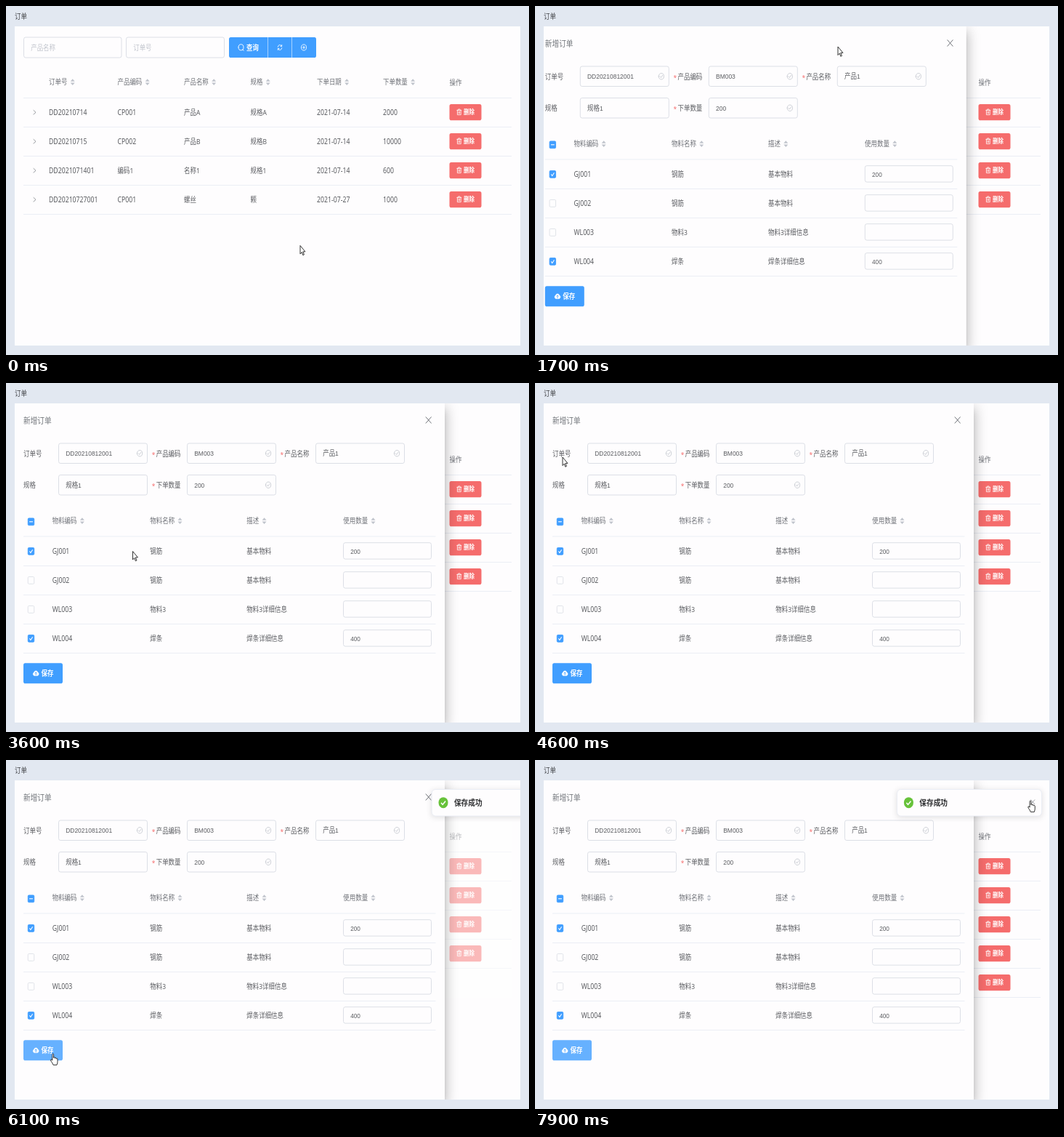
Write an HTML page that moves like this. It is 720 px wide and 480 px high and loops after 8000 ms.

```html
<!DOCTYPE html>
<html lang="zh-CN">
<head>
<meta charset="utf-8">
<title>订单</title>
<style>
  html, body { margin: 0; width: 100%; height: 100%; overflow: hidden; background: #e2e8f1; }
  svg { display: block; width: 720px; height: 480px; }
  text { font-family: "Noto Sans", "Noto Sans CJK SC", "Noto Sans CJK JP", sans-serif; white-space: pre; }
  .field { font-family: "Liberation Sans", "Noto Sans CJK SC", "Noto Sans CJK JP", sans-serif; }
</style>
</head>
<body>
<svg id="stage" viewBox="0 0 720 480" xmlns="http://www.w3.org/2000/svg"></svg>
<script>
// The page is shown at a reduced, slightly narrowed scale.
const SX = 0.605, SY = 0.7;
const BLUE = '#409eff', BLUE_HOVER = '#66b1ff', RED = '#f56c6c', GREEN = '#67c23a';
const PAPER = '#fefdfe', INK = '#5a5c60', HEAD = '#6e7177', PALE = '#c0c4cc', EDGE = '#dcdfe6', RULE = '#ebeef5';
const LOOP = 8000;

const at = (x, y, inner, attrs = '') =>
  `<g transform="translate(${x} ${y}) scale(${SX} ${SY})" ${attrs}>${inner}</g>`;
const text = (x, y, str, { size = 14, fill = INK, weight = 400, cls = '' } = {}) =>
  at(x, y, `<text class="${cls}" font-size="${size}" fill="${fill}" font-weight="${weight}">${str}</text>`);
const box = (x, y, w, h, fill, attrs = '') =>
  `<rect x="${x}" y="${y}" width="${w}" height="${h}" rx="2.4" ry="2.8" fill="${fill}" ${attrs}/>`;
const rule = (x1, x2, y) => `<path d="M${x1} ${y}H${x2}" stroke="${RULE}"/>`;
const icon = (x, y, d, color, width = 1.3, fill = 'none') =>
  at(x, y, `<path d="${d}" fill="${fill}" stroke="${color}" stroke-width="${width}" stroke-linecap="round" stroke-linejoin="round"/>`);
const ring = r => `M${-r} 0a${r} ${r} 0 1 0 ${2 * r} 0a${r} ${r} 0 1 0 ${-2 * r} 0`;
const cross = r => `M${-r} ${-r}L${r} ${r}M${r} ${-r}L${-r} ${r}`;
const cell = (x, cy, str) => /^[\x00-\x7f]+$/.test(str)
  ? text(x, cy + 4, str, { size: 14.4 })
  : text(x, cy + 4, str);

const carets = (x, y) => at(x, y,
  `<path d="M-5 -1.2L0 -6.2L5 -1.2ZM-5 1.4L0 6.4L5 1.4Z" fill="${PALE}"/>`);
const header = (x, cy, str) =>
  text(x, cy + 3.7, str, { fill: HEAD, weight: 500 }) + carets(x + str.length * 14 * SX + 7.3, cy);

function input(x, y, w, h, value, { size = 14, fill = INK, valid = false } = {}) {
  return box(x, y, w, h, PAPER, `stroke="${EDGE}"`) +
    text(x + 9.7, y + h / 2 + 3.6, value, { size, fill, cls: 'field' }) +
    (valid ? icon(x + w - 10.5, y + h / 2, ring(6) + 'M-3 0L-.5 2.5L3 -2', PALE, 1.2) : '');
}

const TRASH = 'M-5 -3.5H5M-2 -3.5V-5.5H2V-3.5M-4 -3.5V5.5H4V-3.5M-1.3 -1V3M1.3 -1V3';
const deleteButton = cy =>
  box(610.5, cy - 11, 44, 22.2, RED) + icon(623.8, cy - .2, TRASH, '#fff', 1.2) +
  text(630, cy + 3.1, '删除', { size: 12.4, fill: '#fff', weight: 700 });

const columns = [59, 153.5, 245, 336.5, 428, 519];
const titles = ['订单号', '产品编码', '产品名称', '规格', '下单日期', '下单数量'];
const orders = [
  ['DD20210714', 'CP001', '产品A', '规格A', '2021-07-14', '2000'],
  ['DD20210715', 'CP002', '产品B', '规格B', '2021-07-14', '10000'],
  ['DD2021071401', '编码1', '名称1', '规格1', '2021-07-14', '600'],
  ['DD20210727001', 'CP001', '螺丝', '颗', '2021-07-27', '1000'],
  ['DD20210812001', 'BM003', '产品1', '规格1', '2021-08-12', '200']
];

const orderRow = (row, i) => {
  const cy = 146 + 40 * i;
  return `<g ${i === 4 ? 'id="newRow"' : ''}>` +
    icon(39.5, cy + .3, 'M-2.5 -4L2.5 0L-2.5 4', '#85888e', 1.3) +
    row.map((s, c) => cell(columns[c], cy + .3, s)).join('') +
    deleteButton(cy) + rule(24, 696, cy + 20.5) + '</g>';
};

const REFRESH = 'M-4.5 -1A4.5 4.5 0 0 1 4 -2.5M4.4 -5V-2.2H1.6M4.5 1A4.5 4.5 0 0 1 -4 2.5M-4.4 5V2.2H-1.6';
const page = `
  <rect width="720" height="480" fill="#e2e8f1"/>
  ${text(12, 17.8, '订单', { fill: '#404246' })}
  <rect x="12" y="28" width="696" height="439" fill="${PAPER}"/>
  ${input(24.5, 43, 134.5, 28, '产品名称', { fill: PALE })}
  ${input(165.5, 43, 135, 28, '订单号', { fill: PALE })}
  ${box(307, 43, 120, 28, BLUE)}
  <path id="addHover" d="M394 43H424.6Q427 43 427 45.8V68.2Q427 71 424.6 71H394Z" fill="${BLUE_HOVER}"/>
  <path d="M360.5 43V71M393.5 43V71" stroke="#a6d2ff"/>
  ${icon(323.5, 56.8, ring(5.8) + 'M4 4.5L6 6.5', '#fff', 1.4)}
  ${text(331, 60.6, '查询', { fill: '#fff', weight: 600 })}
  ${icon(377, 57, REFRESH, '#fff')}
  ${icon(410, 57, ring(5.8) + 'M-2.5 0H2.5M0 -2.5V2.5', '#fff')}
  ${titles.map((s, i) => header(columns[i], 104.6, s)).join('')}
  ${text(610.5, 109.4, '操作', { fill: HEAD, weight: 500 })}
  ${rule(24, 696, 126.5)}
  ${orders.map(orderRow).join('')}
  <rect id="mask" x="24" y="84" width="672" height="243" fill="#fff"/>`;

const checkbox = (cy, mark) => at(34.5, cy,
  `<rect x="-7" y="-7" width="14" height="14" rx="2" fill="${mark ? BLUE : PAPER}" stroke="${mark ? BLUE : EDGE}" stroke-width="1.3"/>` +
  (mark ? `<path d="${mark}" fill="none" stroke="#fff" stroke-width="1.6"/>` : ''));
const TICK = 'M-3.5 0L-1 3L3.5 -3', DASH = 'M-4 0H4';

const materials = [
  ['GJ001', '钢筋', '基本物料', '200'],
  ['GJ002', '钢筋', '基本物料', ''],
  ['WL003', '物料3', '物料3详细信息', ''],
  ['WL004', '焊条', '焊条详细信息', '400']
];
const materialRow = ([code, name, info, count], i) => {
  const cy = 231 + 40 * i;
  return checkbox(cy + .4, count && TICK) + cell(63.7, cy + .3, code) + cell(198.3, cy + .3, name) +
    cell(331.3, cy + .3, info) + input(464.5, cy - 11.3, 121, 22.4, count, { size: 13.6 }) +
    rule(24, 591.5, cy + 20.5);
};
const label = (x, y, str, required) =>
  (required ? text(x - 6, y + 1, '*', { fill: RED }) : '') + text(x, y, str);
const shadow = (x, y, w, h, dy, blur, spread, alpha) =>
  `<rect x="${x - spread}" y="${y + dy - spread}" width="${w + 2 * spread}" height="${h + 2 * spread}" opacity="${alpha}" style="filter:blur(${blur}px)"/>`;

const CLOUD = 'M-4 4.5A3.3 3.3 0 0 1 -4.2 -1.8A4.4 4.4 0 0 1 4.2 -1.8A3.3 3.3 0 0 1 4 4.5Z';
const drawer = `<g id="drawer">
  ${shadow(12, 28, 592, 439, 5.6, 3.2, -3, .2)}
  ${shadow(12, 28, 592, 439, 11, 7.5, 1.3, .14)}
  ${shadow(12, 28, 592, 439, 4, 9.5, 3.2, .12)}
  <rect x="12" y="28" width="592" height="439" fill="${PAPER}"/>
  ${text(24, 56.2, '新增订单', { size: 16, fill: '#72767b' })}
  ${icon(581.7, 51, cross(6), '#66696f', 1.4)}
  ${label(24, 100.6, '订单号')}${input(72.5, 83, 122, 27.5, 'DD20210812001', { valid: true })}
  ${label(206.7, 100.6, '产品编码', true)}${input(249.5, 83, 122, 27.5, 'BM003', { valid: true })}
  ${label(383.6, 100.6, '产品名称', true)}${input(426.5, 83, 122, 27.5, '产品1', { valid: true })}
  ${label(24, 144.2, '规格')}${input(72.5, 126.5, 122, 27.5, '规格1')}
  ${label(206.7, 144.2, '下单数量', true)}${input(249.5, 126.5, 122, 27.5, '200', { valid: true })}
  ${checkbox(190.8, DASH)}
  ${[[63.7, '物料编码'], [198.3, '物料名称'], [331.3, '描述'], [464.3, '使用数量']]
    .map(([x, s]) => header(x, 189.6, s)).join('')}
  ${rule(24, 591.5, 211)}
  ${materials.map(materialRow).join('')}
  ${box(24, 385.2, 54, 28, BLUE, 'id="save"')}
  ${icon(41.2, 399.3, CLOUD, '#fff', 1, '#fff')}
  <path d="M41.2 402V398M39.8 399.4L41.2 397.8L42.6 399.4" fill="none" stroke="${BLUE}" stroke-width=".8"/>
  ${text(48.5, 402.9, '保存', { fill: '#fff', weight: 600 })}
</g>`;

const notice = `<g id="notice">
  ${shadow(498.5, 40.5, 199, 36.5, 1.5, 4, 0, .13)}
  <rect x="498.5" y="40.5" width="199" height="36.5" rx="4.8" ry="5.6" fill="${PAPER}" stroke="${RULE}"/>
  ${at(514.4, 58.7, `<circle r="10.8" fill="${GREEN}"/><path d="M-5 .2L-1.5 3.8L5 -3" fill="none" stroke="#fff" stroke-width="2.2"/>`)}
  ${text(529.3, 62.7, '保存成功', { size: 16, fill: '#303133', weight: 700 })}
  ${icon(685.3, 57.8, cross(4.3), '#909399', 1.3)}
</g>`;

const ARROW = 'M0 0V16.5L3.8 13L6.4 19L9 17.8L6.4 12H11.5Z';
const HAND = 'M-1.5 13V2Q-1.5 0 0 0T1.5 2V8Q1.8 6.6 3.2 6.8T4.6 8.4V9Q5 7.6 6.3 7.9T7.7 9.5V10.2Q8 9 9.2 9.3T10.4 11V15.5Q10.4 18 8.8 22H.5Q-.8 18.5 -4.5 14.5Q-6 12.4 -4.6 11.4T-1.5 13Z';

const stage = document.getElementById('stage');
stage.innerHTML = `<defs><clipPath id="panel"><rect x="12" y="28" width="696" height="439"/></clipPath></defs>
  ${page}<g clip-path="url(#panel)">${drawer}${notice}</g>
  <g id="cursor"><path id="pointer" fill="#fff" stroke="#222" stroke-width="1.4" stroke-linejoin="round"/></g>`;
const parts = Object.fromEntries(
  ['addHover', 'newRow', 'mask', 'drawer', 'save', 'notice', 'cursor', 'pointer']
    .map(id => [id, document.getElementById(id)]));

const clamp = u => Math.min(1, Math.max(0, u));
const span = (t, start, length) => clamp((t - start) / length);
const smooth = u => u * u * (3 - 2 * u);
const easeIn = u => u * u;
const easeOut = u => 1 - (1 - u) ** 2;

// CSS "ease": cubic-bezier(.25, .1, .25, 1)
function ease(x) {
  const curve = (a, b, s) => 3 * a * s * (1 - s) ** 2 + 3 * b * s * s * (1 - s) + s ** 3;
  let lo = 0, hi = 1;
  for (let i = 0; i < 24; i++) {
    const mid = (lo + hi) / 2;
    if (curve(.25, .25, mid) < x) lo = mid; else hi = mid;
  }
  return curve(.1, 1, lo);
}

const OPEN = 1452, SAVED = 6000;
const route = [
  [0, 405, 329.5], [150, 405, 329.5], [900, 417, 56, smooth], [2800, 417, 56],
  [3550, 174.5, 231, smooth], [3750, 174.5, 233], [4450, 38, 102, smooth],
  [4700, 38, 102], [5350, 64.7, 404, smooth], [6500, 64.7, 404],
  [7250, 273, 222, easeIn], [7850, 682, 56, easeOut], [LOOP, 682, 56]
];
function cursorAt(t) {
  const i = route.findIndex(p => p[0] > t);
  const [t0, x0, y0] = route[i - 1], [t1, x1, y1, easing = u => u] = route[i];
  const u = easing((t - t0) / (t1 - t0));
  return [x0 + (x1 - x0) * u, y0 + (y1 - y0) * u];
}

const show = (el, on) => el.setAttribute('display', on ? 'inline' : 'none');

function draw(t) {
  const [x, y] = cursorAt(t);
  const over = (l, top, r, b) => x > l && x < r && y > top && y < b;
  const hidden = 592 * (1 - ease(span(t, OPEN, 300)));
  const covered = t > OPEN && 604 - hidden > x;
  const onAdd = !covered && over(394, 43, 427, 71);
  const onSave = covered && over(24, 385, 78, 413);
  const onClose = t > SAVED + 300 && over(677, 51, 693, 67);

  show(parts.addHover, onAdd || t >= OPEN);
  show(parts.drawer, t >= OPEN);
  parts.drawer.setAttribute('transform', `translate(${-hidden} 0)`);
  // The button keeps its lighter look after the click through focus.
  parts.save.setAttribute('fill', onSave || t > SAVED ? BLUE_HOVER : BLUE);

  show(parts.newRow, t >= SAVED + 200);
  parts.mask.setAttribute('opacity', .9 * ease(span(t, SAVED, 300)) * (1 - span(t, SAVED + 200, 300)));

  show(parts.notice, t >= SAVED);
  parts.notice.setAttribute('transform', `translate(${209.5 * (1 - ease(span(t, SAVED, 300)))} 0)`);

  parts.pointer.setAttribute('d', onAdd || onSave || onClose ? HAND : ARROW);
  parts.cursor.setAttribute('transform', `translate(${x} ${y}) scale(${SX} ${SY})`);
}

const start = performance.now();
function frame(now) {
  draw(Math.max(0, now - start) % LOOP);
  requestAnimationFrame(frame);
}
draw(0);
requestAnimationFrame(frame);
</script>
</body>
</html>
```
